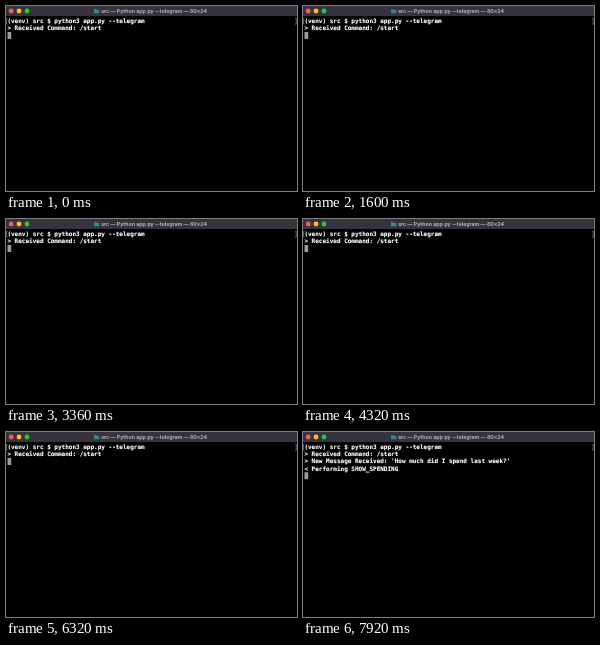
Animation, 291 px wide and 185 px high, one loop 8 s. Source, as an HTML page:

```html
<!DOCTYPE html>
<html lang="en">
<head>
<meta charset="utf-8">
<title>Terminal</title>
<style>
  html, body { margin: 0; width: 100%; height: 100%; overflow: hidden; background: #222; }
  svg { display: block; width: 100vw; height: 100vh; }
  .title { font: 700 5.2px Inter, "Open Sans", sans-serif; fill: #b6b4ba; }
  .shell { font: bold 6px "DejaVu Sans Mono", "Liberation Mono", monospace; fill: #fff; stroke: #fff; stroke-width: .12px; white-space: pre; }
  .mark { fill: none; stroke: #8c8c8c; stroke-width: .7px; }
  .cursor { fill: #9c9c9c; animation: drop 8s step-end infinite; }
  .reply { visibility: hidden; animation: reveal 8s step-end infinite; }

  /* The message arrives at 6640 ms */
  @keyframes reveal {
    0% { visibility: hidden; }
    83%, 100% { visibility: visible; }
  }
  @keyframes drop {
    0% { transform: translateY(0); }
    83%, 100% { transform: translateY(14.2px); }
  }
</style>
</head>
<body>
<svg viewBox="0 0 291 185" preserveAspectRatio="none">
  <path d="M0 0H291V182.5q0 2.5 -2.5 2.5H2.5q-2.5 0 -2.5 -2.5z" fill="#000"/>

  <rect width="291" height="10" fill="#36333d"/>
  <circle cx="5.2" cy="5" r="2.4" fill="#fc5b57"/>
  <circle cx="13" cy="5" r="2.4" fill="#fdbc2e"/>
  <circle cx="21" cy="5" r="2.4" fill="#28c840"/>
  <path d="M88 3h2l.6.7h2.6v3.6H88z" fill="#2f8a98"/>
  <text class="title" x="95.2" y="6.9">src — Python app.py --telegram — 80×24</text>

  <g class="shell">
    <text x="1.4" y="17">(venv) src $ python3 app.py --telegram</text>
    <text x="1.4" y="24.2">&gt; Received Command: /start</text>
    <g class="reply">
      <text x="1.4" y="31.4">&gt; New Message Received: 'How much did I spend last week?'</text>
      <text x="1.4" y="38.6">&lt; Performing SHOW_SPENDING</text>
    </g>
  </g>
  <path class="mark" d="M1.6 12.2H.6V18.2H1.6M289.2 12.2H290.2V18.2H289.2"/>
  <rect class="cursor" x="1.5" y="26" width="3.7" height="7"/>
</svg>
</body>
</html>
```
